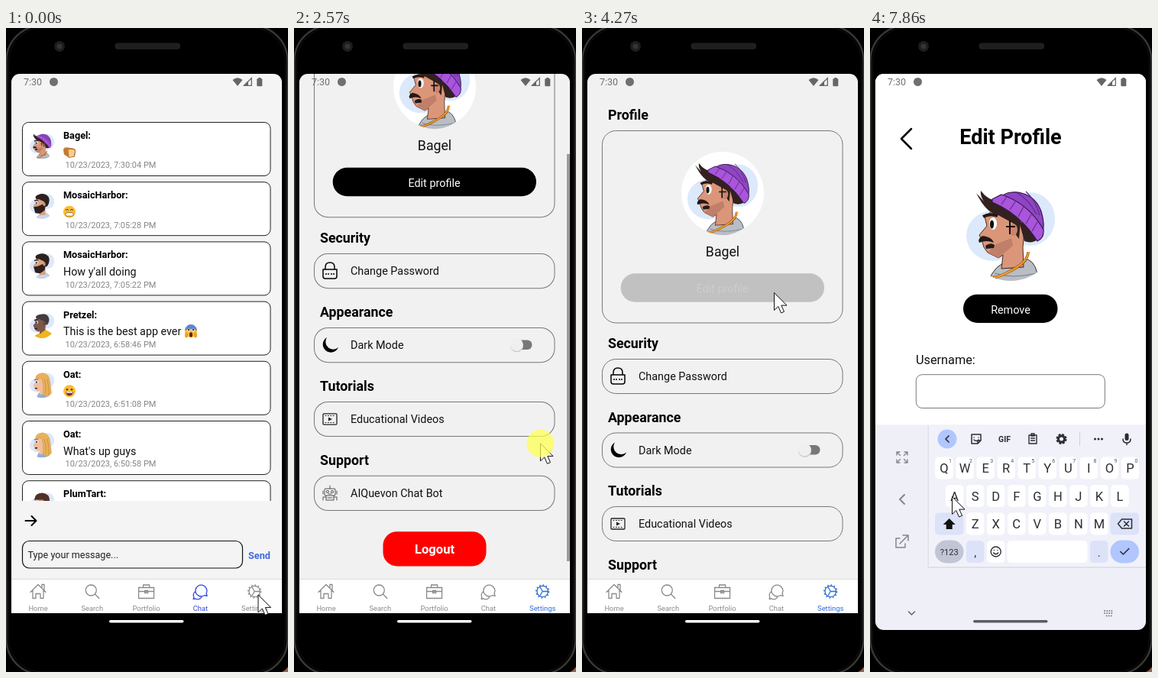
Recreate the animation shown at these times as an HTML page. Size 369 by 843 pixels, loop 7.99 s.

```html
<!DOCTYPE html>
<html lang="en">
<head>
<meta charset="utf-8">
<title>Phone demo</title>
<style>
html, body { margin: 0; width: 100%; height: 100%; overflow: hidden; background: #000; }
svg { display: block; width: 369px; height: 843px; font-family: Roboto, sans-serif; }
svg svg { width: auto; height: auto; }
.b { font-weight: 700; }
.m { text-anchor: middle; }
</style>
</head>
<body>
<svg id="stage" viewBox="0 0 369 843"></svg>
<script>
const LOOP = 7990;
const USER = 'Bagel';
const SCREEN_TOP = 60, CONTENT_END = 721;

// Drawing helpers; y of text is the middle of its capitals.
const text = (x, y, s, size, fill = '#000', cls = '') =>
  `<text x="${x}" y="${(y + size * .355).toFixed(2)}" font-size="${size}" fill="${fill}" class="${cls}">${s}</text>`;
const box = (x, y, w, h, r, fill, stroke = 'none', sw = 1) =>
  `<rect x="${x}" y="${y}" width="${w}" height="${h}" rx="${r}" fill="${fill}" stroke="${stroke}" stroke-width="${sw}"/>`;
const disc = (x, y, r, fill, extra = '') => `<circle cx="${x}" cy="${y}" r="${r}" fill="${fill}" ${extra}/>`;
const oval = (x, y, rx, ry, fill) => `<ellipse cx="${x}" cy="${y}" rx="${rx}" ry="${ry}" fill="${fill}"/>`;
const shape = (d, fill, stroke = 'none', sw = 1) => `<path d="${d}" fill="${fill}" stroke="${stroke}" stroke-width="${sw}"/>`;
const line = (x, y, d, stroke = '#000', sw = 1.4, dash = 'none') =>
  `<path transform="translate(${x} ${y})" d="${d}" fill="none" stroke="${stroke}" stroke-width="${sw}" stroke-dasharray="${dash}" stroke-linecap="round" stroke-linejoin="round"/>`;
const group = (id, body) => `<g id="${id}">${body}</g>`;
const at = (x, y, body, scale = 1) => `<g transform="translate(${x} ${y}) scale(${scale})">${body}</g>`;

// Avatars live in a 118 unit square.
const blob = oval(36, 59, 35, 33, '#dce9fb') + oval(85, 37, 32, 35, '#dce9fb');
const FACE = 'M38 24L25 34L28 46L18 58L21 64L24 74L29 81L43 88L49 84L47 102L76 100L75 74L78 42L62 22Z';
const features = hair =>
  oval(36, 43, 5, 8, '#fff') + oval(34.5, 44, 2.6, 5.5, '#111') +
  shape('M23 34Q32 29 42 33', 'none', hair, 4) + shape('M26 72Q33 67 38 71L37 75L27 76Z', '#251a1a');
const avatars = {
  beanie: blob +
    shape('M30 119Q38 96 56 93L82 90Q94 96 95 118Z', '#b9bdc4', '#333') +
    shape('M48 97Q60 108 80 92M38 108Q60 116 93 108', 'none', '#777b84') +
    shape(FACE, '#db967a', '#442820') +
    shape('M29 81L43 88L62 72L60 62L40 70Z', '#c07f68') +
    shape('M41 31Q27 29 14 3L24 14Q19 7 20 0Q31 15 47 13Q68 29 72 40L70 63Q62 55 63 43Z', '#32211f') +
    shape('M70 40Q89 47 96 63Q87 70 77 66Z', '#32211f') +
    oval(62, 51, 6, 8, '#cf8469') + shape('M58 39V57M53 47H65', 'none', '#111', 2) + features('#241817') +
    shape('M17 65Q20 57 27 60Q35 62 37 68Q28 64 18 68Z', '#241817') +
    shape('M35 113Q40 115 55 107Q82 94 82 80', 'none', '#9a5413', 3.6) +
    shape('M35 113Q40 115 55 107Q82 94 82 80', 'none', '#f4a12d', 2) +
    shape('M46 8C59 -4 90 1 99 27Q104 43 101 54Q78 25 46 8Z', '#8f45c4', '#35194d', 1.2) +
    shape('M35 11L47 5Q83 17 102 51Q103 62 94 66Q71 30 35 15Z', '#a955dc', '#35194d', 1.2) +
    shape('M54 8L47 18M66 13L58 25M76 21L69 34M86 31L79 43M94 41L87 53M66 2Q82 10 93 31M79 1Q92 13 97 32', 'none', '#5d2a85', 1.1),
  beard: blob +
    shape('M30 119Q40 94 80 92Q97 102 98 119Z', '#c6d6f0', '#456') +
    shape(FACE, '#dba07f') +
    shape('M33 27Q22 12 40 6Q70 -7 90 15Q100 40 83 61L74 62L69 38L46 27Z', '#2d211f') +
    shape('M20 63L40 60L62 50L76 56L72 79L50 94L28 91Z', '#30211e') +
    oval(70, 50, 6, 9, '#cf9070') + features('#2d211f'),
  hoodie: blob +
    shape(FACE, '#7b574a') +
    shape('M31 25Q27 10 49 7L67 4Q91 7 93 29Q92 52 80 57L69 39L47 28Z', '#453c3b') +
    shape('M18 119Q30 98 49 98L75 78L104 96L110 119Z', '#f1b51f', '#8b6310') +
    oval(70, 50, 6, 9, '#6d493d') + features('#251b1a'),
  blond: blob +
    shape('M32 119L44 94L90 93L98 119Z', '#8fb0dd') +
    shape(FACE, '#efbea0') +
    shape('M30 31Q26 5 63 1Q94 5 97 42L105 104Q90 120 64 103L65 56L58 28Q48 22 30 31Z', '#e9b158', '#ad7429') +
    shape('M70 30Q81 70 76 101M84 28Q94 70 91 106', 'none', '#b57a2e', 2) + features('#9b6a2b'),
  brown: blob + shape(FACE, '#c98f73') +
    shape('M26 34Q23 6 60 3Q96 6 95 42L90 68L72 55L66 35Z', '#503128') + features('#3a221d')
};
const avatar = (kind, x, y, size) => at(x, y, `<g clip-path="url(#bowl)">${avatars[kind]}</g>`, size / 118);

// Emoji, centred at 0,0.
const eyes = disc(-3, -2, 1.3, '#5c371c') + disc(3, -2, 1.3, '#5c371c');
const emoji = {
  loaf: shape('M-8-3Q-7-7-2-6L5-5Q9-4 8 0L7 6L-1 7L-7 3Z', '#c67a31') + shape('M-2-2Q-1-5 4-4Q9-3 7 1L6 6L-1 7Z', '#f5cf8e', '#a9652a', .8),
  beam: disc(0, 0, 8, '#fbbd32') + shape('M-5-2q2-3 4 0M1-2q2-3 4 0', 'none', '#5c371c') + box(-5, 1, 10, 4.5, 2, '#fff', '#8c5a24', .8),
  grin: disc(0, 0, 8, '#fbbd32') + eyes + shape('M-5 1H5Q4 6 0 6T-5 1Z', '#7a2f25') + box(-4, 1, 8, 1.5, .5, '#fff'),
  scream: disc(0, 0, 8, '#fbbd32') + shape('M-8-1A8 8 0 0 1 8-1Q0-5-8-1Z', '#5e86cf') + disc(-3, -1.5, 2, '#fff') + disc(3, -1.5, 2, '#fff') + eyes +
    oval(0, 4.5, 2, 3.3, '#4a2a22') + oval(-6, 5, 2, 3.5, '#f2a01d') + oval(6, 5, 2, 3.5, '#f2a01d')
};

function chatPage() {
  const posts = [
    [USER, 'beanie', '', 'loaf', '7:30:04'],
    ['MosaicHarbor', 'beard', '', 'beam', '7:05:28'],
    ['MosaicHarbor', 'beard', 'How y\'all doing', '', '7:05:22'],
    ['Pretzel', 'hoodie', 'This is the best app ever', 'scream', '6:58:46'],
    ['Oat', 'blond', '', 'grin', '6:51:08'],
    ['Oat', 'blond', 'What\'s up guys', '', '6:50:58'],
    ['PlumTart', 'brown', '', 'grin', '6:50:11']
  ];
  const cards = posts.map(([name, face, msg, icon, time], i) => {
    const y = 123.5 + 78.2 * i;
    return box(21.5, y, 324.5, 70, 8, '#fff', '#222') + avatar(face, 30.5, y + 15, 33) +
      text(75, y + 17, name + ':', 12.7, '#000', 'b') + text(75, y + 39, msg, 14.3, '#111') +
      (icon ? at(msg ? 242 : 83, y + 39, emoji[icon]) : '') +
      text(77.5, y + 56, `10/23/2023, ${time} PM`, 11, '#858585');
  }).join('');
  return box(7, 60, 354, 706, 0, '#f4f4f4') + `<g clip-path="url(#list)">${cards}</g>` +
    line(32.5, 645, 'M-7 0H7M1-6L7 0L1 6', '#000', 2) +
    box(21.5, 671.5, 288, 35.5, 9, '#f4f4f4', '#111', 1.2) +
    text(28.5, 690, 'Type your message...', 12.6, '#222') + text(317, 690, 'Send', 12.7, '#4169e1', 'b');
}

function settingsPage() {
  const heading = (y, s) => text(34, y, s, 17.8, '#000', 'b');
  const row = (title, label, y, icon) =>
    heading(y - 43, title) + box(26.5, y - 22.5, 314.5, 45, 18, 'none', '#777') +
    text(74, y + .3, label, 14.4, '#111') + at(47, y, icon);
  const lock = line(0, 0, 'M-9-2H9V7Q9 10 6 10H-6Q-9 10-9 7ZM-6-2V-5Q-6-11 0-11T6-5V-2', '#000', 1.5) +
    line(0, 4, 'M-5 0h0M-2 0h0M2 0h0M5 0h0', '#000', 2);
  const moon = shape('M-4-10A10.5 10.5 0 1 0 11 3A10 10 0 0 1-4-10Z', '#000');
  const film = box(-9, -7, 18, 14, 1, 'none', '#222', 1.3) + line(0, 0, 'M-6-4.5H6M-6 4.5H6', '#222', 1, '1 2.4') +
    shape('M-2-2.5L3 0L-2 2.5Z', '#222');
  const robot = box(-7, -6, 14, 9, 1.5, 'none', '#555') + disc(-3, -2, 1.5, 'none', 'stroke="#555"') + disc(3, -2, 1.5, 'none', 'stroke="#555"') +
    line(0, 0, 'M0-6V-10M-2 1H2M-5 3V9H5V3M-5 5H-9V9M5 5H9V9M-9-3V1M9-3V1M-3 6H3', '#555', 1);
  const toggle = box(286, 546, 25.5, 12.5, 6.2, '#777') + disc(291.5, 553.2, 8.6, '#c9c9c9') + disc(291.3, 552, 8.4, '#efefef');
  return heading(113.5, 'Profile') + box(26.5, 134.5, 314.5, 251.5, 18, 'none', '#777') +
    disc(184, 216, 54, '#fff') + avatar('beanie', 137, 177, 94) +
    text(184, 292.5, USER, 17.7, '#111', 'm') +
    group('editButton', box(50.7, 321.3, 266.3, 37.4, 18.7, '#000') + text(183.5, 341, 'Edit profile', 14.4, '#fff', 'm')) +
    row('Security', 'Change Password', 456, lock) + row('Appearance', 'Dark Mode', 552.5, moon) + toggle +
    row('Tutorials', 'Educational Videos', 649, film) + row('Support', 'AIQuevon Chat Bot', 745.5, robot) +
    box(116.5, 795.5, 135, 45, 18, '#f00') + text(184, 818.5, 'Logout', 16.6, '#fff', 'b m');
}

function editPage() {
  return box(7, 60, 354, 706, 0, '#fff') + line(47.5, 145, 'M6.5-13L-6.5 0L6.5 13', '#000', 2.5) +
    text(184, 142.5, 'Edit Profile', 27, '#000', 'b m') + avatar('beanie', 125, 213, 118) +
    box(122, 348.7, 123.5, 37.3, 18.5, '#000') + text(184, 368.5, 'Remove', 14.4, '#fff', 'm') +
    text(60, 434, 'Username:', 16.3, '#111') + box(60.3, 453.7, 247, 43.8, 8, '#fff', '#777') +
    text(69.5, 476.5, `<tspan id="field">${USER}</tspan>`, 12.7, '#111') + '<rect id="caret" y="467" width="1.3" height="18" fill="#222"/>' +
    text(60, 528, 'Email:', 16.3, '#111') + box(60.3, 547.7, 247, 43.8, 8, '#fff', '#777') +
    text(69.5, 570.5, 'qv38157046@post.test', 12.7, '#111') +
    box(60, 634.7, 247.5, 37.3, 18.5, '#000') + text(184, 654.5, 'Save', 14.2, '#fff', 'm');
}

const TABS = [
  ['Home', 'M-10 1L0-9L10 1M-7-1V9H-3V3H3V9H7V-1M5-5V-9H8V-2'],
  ['Search', 'M-8.5-1.5a7 7 0 1 0 14 0a7 7 0 1 0-14 0M4 4L9 9'],
  ['Portfolio', 'M-10-5H10V9H-10ZM-10 0H10M-4-5V-8.5H4V-5M-2-1H2V2H-2Z'],
  ['Chat', 'M-6.5-1.5a7.5 7.5 0 1 1 14.2 4l1 3.5-3.6-.8a7.5 7.5 0 0 1-11.6-6.7M-6.5 0a6 6 0 0 0-2 7.5l-.8 2.7 2.8-.7a6 6 0 0 0 8-2'],
  ['Settings', 'M-7.2 0a7.2 7.2 0 1 0 14.4 0a7.2 7.2 0 1 0-14.4 0M7 0H0L-3.5-6M0 0L-3.5 6']
];
function tabBar(active, color) {
  return box(7, 721, 354, 45, 0, '#fff') + box(7, 721, 354, 1, 0, '#dcdcdc') + TABS.map(([name, d], i) => {
    const x = 42 + 70.8 * i, c = name === active ? color : '#8a8a8a';
    const teeth = name === 'Settings' ? disc(x, 737.5, 8.5, 'none', `stroke="${c}" stroke-width="1.6" stroke-dasharray="1.6 2.85"`) : '';
    return teeth + line(x, 737.5, d, c, 1.3) + text(x, 760, name, 9.4, c, 'm');
  }).join('');
}

function keyboard() {
  const PITCH = 27.05, INK = '#2c2d33', TINT = '#dce2f8', ACCENT = '#b1c5ff';
  const keys = (letters, x0, y, digits) => [...letters].map((c, i) => {
    const x = x0 + PITCH * i;
    return box(x - 11.7, y - 14.5, 23.4, 29, 5, '#fff') + text(x, y + .5, c, 16.5, INK, 'm') +
      (digits ? text(x + 8, y - 9, (i + 1) % 10, 7, '#55565c', 'm') : '');
  }).join('');
  return box(7, 519.5, 354, 270, 0, '#efeff7') + box(75.5, 520, 290, 187, 0, '#dfdfe8') + box(77, 519.5, 290, 185.5, 0, '#f1f1fa') +
    line(42, 562, 'M-7-3V-7H-3M3-7H7V-3M7 3V7H3M-3 7H-7V3M-6-6L-2.5-2.5M6-6L2.5-2.5M6 6L2.5 2.5M-6 6L-2.5 2.5', '#85868d', 1.4) +
    line(42, 617, 'M3-6L-3 0L3 6', '#85868d', 2) + line(42, 672, 'M-3-4H-8V8H4V3M-3 3L7-7M1-8H8V-1', '#85868d', 1.5) +
    disc(101, 538, 12.5, ACCENT) + line(101, 538, 'M2-4L-2 0L2 4', INK, 1.7) +
    line(139, 538, 'M-6-6H6V2L2 6H-6ZM6 2H2V6M-3-2h0M3-2h0M-3 1Q0 4 3 1', INK, 1.5) + text(176, 538, 'GIF', 10.5, INK, 'b m') +
    line(213, 538, 'M-5-5H5V6H-5ZM-2-7H2V-4H-2ZM-2.5-1H2.5M-2.5 2H2.5', INK, 1.4) +
    disc(250.5, 538, 4, 'none', `stroke="${INK}" stroke-width="3"`) + disc(250.5, 538, 6, 'none', `stroke="${INK}" stroke-width="2" stroke-dasharray="3 1.7"`) +
    box(274, 529, 1, 18, 0, '#cfd0d8') + [-4.5, 0, 4.5].map(d => disc(299 + d, 538, 1.5, INK)).join('') +
    box(333.5, 530.5, 5, 9.5, 2.5, INK) + line(336, 538, 'M-5 0Q-5 5 0 5T5 0M0 5V7.5', INK, 1.5) +
    keys('QWERTYUIOP', 97, 576, true) + keys('ASDFGHJKL', 110.6, 612.5) + keys('ZXCVBNM', 137.6, 649) +
    box(85, 634.5, 37.5, 29, 5, TINT) + at(103.7, 649, shape('M0-7L8 1H4V7H-4V1H-8Z', '#111')) +
    `<rect id="erase" x="314.5" y="634.5" width="37.5" height="29" rx="5"/>` +
    line(333.5, 649, 'M-9 0L-4-6H9V6H-4ZM-1-3L5 3M5-3L-1 3', INK, 1.5) +
    box(85, 670.5, 37.5, 30, 15, '#c1c5d6') + text(103.7, 686, '?123', 11, INK, 'm') +
    box(126, 671, 23.4, 29, 5, TINT) + text(137.7, 687, ',', 15, INK, 'm') + box(153, 671, 23.4, 29, 5, '#fff') +
    disc(164.7, 685.5, 6.5, 'none', `stroke="${INK}" stroke-width="1.4"`) + line(164.7, 685.5, 'M-2.3-2h0M2.3-2h0M-3 1.5Q0 5 3 1.5', INK, 1.5) +
    box(179.5, 671, 105, 29, 5, '#fff') + box(288, 671, 23.4, 29, 5, TINT) + text(299.7, 687, '.', 15, INK, 'm') +
    box(314.5, 670.5, 37.5, 30, 15, ACCENT) + line(333.3, 685.5, 'M-5.5 0L-2 3.5L5.5-4', INK, 1.6) +
    line(54.5, 766, 'M-4-2L0 2L4-2', '#62636a', 1.5) +
    line(313, 766, 'M-6-3H6M-6 0H6M-3.5 3.5H3.5', '#77787f', 1.8, '.1 3');
}

const statusBar = text(23, 71, '7:30', 12.5, '#707070') + disc(62.5, 70.5, 5.5, '#707070') +
  shape('M296.5 68Q303 62.5 309.5 68L303 76Z', '#666') + shape('M311.5 75.3L321.3 65.5V75.3Z', 'none', '#666', 1.3) +
  shape('M311.5 75.5L317 70V75.5Z', '#666') + box(328.3, 66.3, 7, 10, 1, '#666') + box(330.2, 65, 3.2, 2, 0, '#666');

const stage = document.getElementById('stage');
stage.innerHTML = `<defs>
  <clipPath id="bowl"><path d="M-5-5H123V59H118A59 59 0 0 1 0 59H-5Z"/></clipPath>
  <clipPath id="list"><rect x="7" y="60" width="354" height="559"/></clipPath>
  <clipPath id="scroller"><rect x="7" y="60" width="354" height="661"/></clipPath>
  <clipPath id="screen"><rect x="7" y="60" width="354" height="728" rx="11"/></clipPath></defs>` +
  box(0, 0, 369, 843, 0, '#000') + box(.5, -3, 368, 849, 46, '#000', '#383838', 2.5) + box(3.5, 0, 362, 843, 43, 'none', '#141414', 1) +
  shape('M369 836V843H361Q366 841 369 836Z', '#a55f52') +
  disc(70, 24, 7, '#1d1d1f') + disc(70, 24, 3.5, '#333338') + box(142.5, 19.5, 85.5, 8.5, 4, '#1f1f1f') +
  `<g clip-path="url(#screen)">` +
    group('chat', chatPage() + tabBar('Chat', '#3147dc')) +
    group('settings', box(7, 60, 354, 706, 0, '#f1f1f1') + `<g clip-path="url(#scroller)">${group('content', settingsPage())}
      <rect id="bar" x="357" width="4" height="533" fill="#9a9a9a"/></g>` + tabBar('Settings', '#2f6bd0')) +
    group('edit', editPage()) + statusBar + group('keys', keyboard()) +
  `</g><rect id="handle" x="135" y="775" width="97.5" height="3.6" rx="1.8"/>` +
  group('cursor', shape('M0 0V23L5.3 18L9 26.5L13 24.8L9.3 16.6H16.5Z', '#fff', '#111', 1)) +
  `<circle id="press" r="18" fill="#ffff50" opacity=".72"/>`;

const el = {};
for (const id of ['chat', 'settings', 'content', 'bar', 'edit', 'editButton', 'field', 'caret', 'keys', 'erase', 'handle', 'cursor', 'press'])
  el[id] = document.getElementById(id);

// Each row: time, then the values reached at that time.
const CURSOR = [[0, 330, 742], [770, 330, 742], [1000, 305, 689], [1270, 305, 689], [1530, 318.5, 590], [1800, 326, 505], [2010, 326, 492],
  [2270, 326, 492], [2570, 322.5, 543.5], [3040, 306, 703], [3100, 304, 707], [3390, 296.5, 692], [3470, 296.5, 692], [3860, 258, 372],
  [3910, 258, 372], [4000, 251.5, 346.5], [4780, 251.5, 346.5], [5260, 183.5, 474], [5680, 183.5, 474], [6200, 336, 646], [7340, 336, 646], [7860, 107.5, 613.5]];
const SCROLL = [[1340, 0], [1530, 45.4], [1810, 136], [2600, 136], [2970, 0]];
const STRETCH_END = [[1810, 0], [2010, .018], [2270, .018], [2570, .005], [2600, 0]];
const STRETCH_TOP = [[2970, 0], [3100, .018], [3390, .0075], [3600, 0]];
const BAR = [[3900, 1], [4000, 0]];
const BUTTON = [[4160, 1], [4270, .2], [4470, .2], [4620, 1]];
const OPEN = [[4480, 0], [4780, 1]];
const KEYS = [[5560, 0], [5850, 1]];
const ERASED = [6290, 6470, 6650, 6830, 7070];
const PRESSED = [[80, 170], [1270, 3130], [4170, 4260], [5410, 5510], ...ERASED.map(t => [t - 50, t + 50])];

function track(rows, t) {
  const i = rows.findIndex(r => r[0] > t);
  if (i === 0) return rows[0].slice(1);
  if (i < 0) return rows[rows.length - 1].slice(1);
  const [a, b] = [rows[i - 1], rows[i]], k = (t - a[0]) / (b[0] - a[0]);
  return a.slice(1).map((v, j) => v + (b[j + 1] - v) * k);
}
const show = (node, on) => node.setAttribute('visibility', on ? 'visible' : 'hidden');
const decel = k => 1 - (1 - k) ** 3;

function draw(t) {
  const [x, y] = track(CURSOR, t), [scroll] = track(SCROLL, t), [end] = track(STRETCH_END, t), [top] = track(STRETCH_TOP, t);
  const pressed = PRESSED.some(([a, b]) => t >= a && t < b);
  el.cursor.setAttribute('transform', `translate(${x} ${y})`);
  el.press.setAttribute('transform', `translate(${x} ${y})`);
  show(el.press, pressed);

  show(el.chat, t < 170);
  show(el.settings, t >= 170);
  const anchor = end ? CONTENT_END : SCREEN_TOP;
  el.content.setAttribute('transform', `translate(0 ${anchor}) scale(1 ${1 + end + top}) translate(0 ${-anchor - scroll})`);
  el.bar.setAttribute('y', 62 + .757 * scroll);
  el.bar.setAttribute('opacity', track(BAR, t)[0]);
  el.editButton.setAttribute('fill-opacity', track(BUTTON, t)[0]);

  const open = track(OPEN, t)[0], scale = .85 + .15 * decel(open);
  el.edit.setAttribute('opacity', Math.min(1, open * 1.6));
  el.edit.setAttribute('transform', `translate(184 413) scale(${scale}) translate(-184 -413)`);

  const rise = decel(track(KEYS, t)[0]);
  el.keys.setAttribute('transform', `translate(0 ${270 * (1 - rise)})`);
  show(el.keys, rise > 0);
  el.handle.setAttribute('fill', rise > .1 ? '#5c5c61' : '#fff');

  const gone = ERASED.filter(e => t >= e);
  el.field.textContent = USER.slice(0, USER.length - gone.length);
  const since = t - (gone[gone.length - 1] || 5510);
  el.caret.setAttribute('x', 69.5 + (el.field.textContent ? el.field.getComputedTextLength() + .5 : 0));
  show(el.caret, since >= 0 && since % 1000 < 500);
  el.erase.setAttribute('fill', pressed && t > 6000 ? '#c3cbe6' : '#dce2f8');
}

const start = performance.now();
function tick() {
  draw((performance.now() - start) % LOOP);
  requestAnimationFrame(tick);
}
tick();
</script>
</body>
</html>
```
